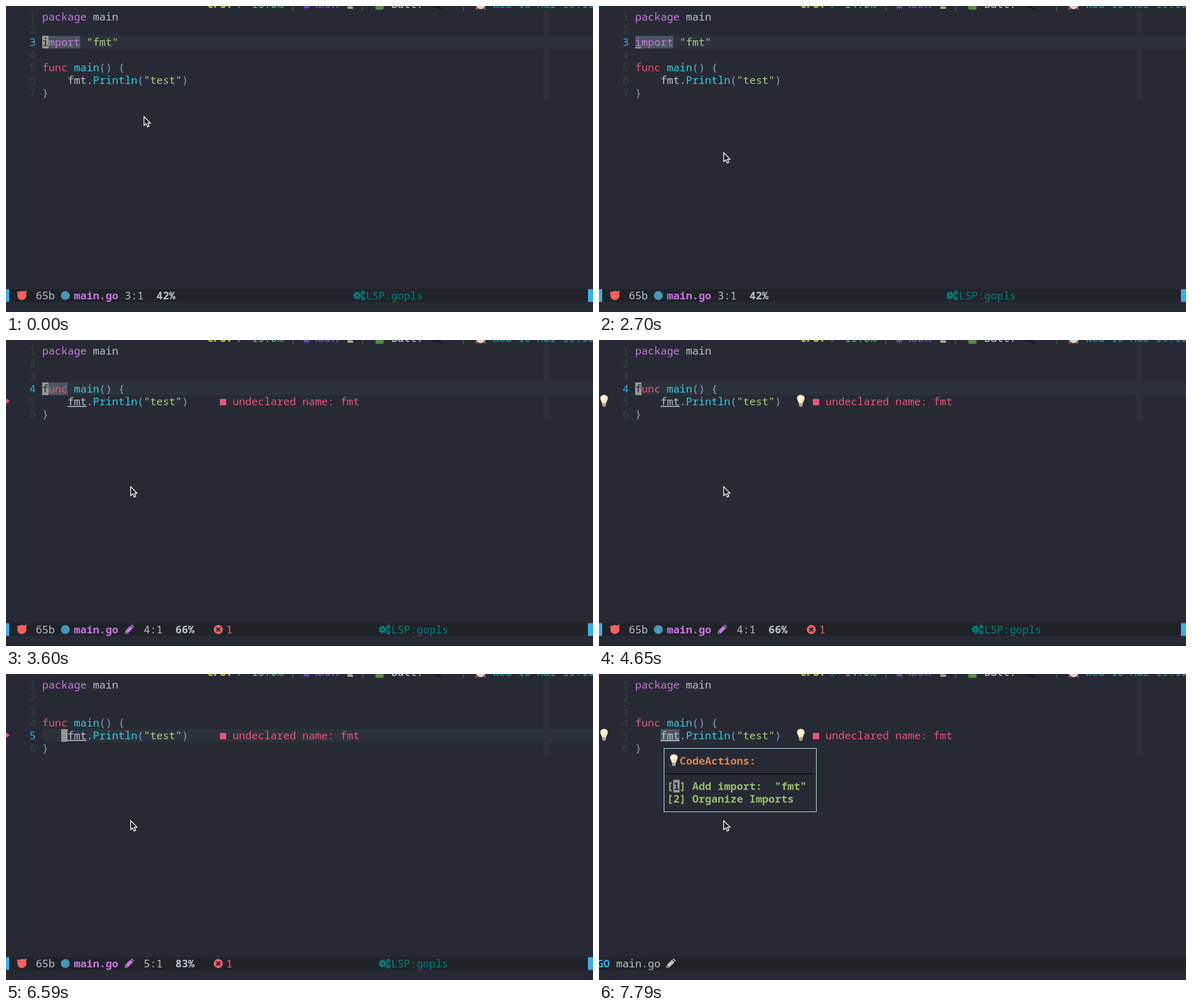
These frames come from a looping animation (925x483 px, 8 s). An HTML page with a canvas:

```html
<!DOCTYPE html>
<html lang="en">
<head>
<meta charset="utf-8">
<title>Editor code action</title>
<style>
html, body { margin: 0; width: 100%; height: 100%; overflow: hidden; background: #272a34; }
canvas { display: block; }
</style>
</head>
<body>
<canvas id="stage" width="925" height="483"></canvas>
<script>
const ctx = document.getElementById('stage').getContext('2d');
const LOOP = 8000, CELL = 10, ROW = 20, LEFT = 57;
const FONT = '16.667px "Noto Sans Mono", "DejaVu Sans Mono", monospace';
const C = {
  bg: '#272a34', line: '#2c323b', column: '#2d303a', bar: '#202328', fg: '#bbc2cf',
  dim: '#3b4049', blue: '#38aeec', magenta: '#c678dd', red: '#e95678', cyan: '#36d0e0',
  bracket: '#80a0c2', string: '#abcf84', teal: '#008080', cursor: '#969696',
  word: '#4b5561', alert: '#fa5f66', menu: '#98be65', gopher: '#4698b8'
};

// Each step changes part of the state and keeps the rest.
const steps = [
  { at: 0, line: 3, col: 1, word: 6, cpu: '16.0%', mouse: [217, 174] },
  { at: 150, mouse: [216, 174] },
  { at: 300, mouse: [214, 177] },
  { at: 450, mouse: [213, 177] },
  { at: 900, mouse: [200, 222] },
  { at: 1050, mouse: [196, 231] },
  { at: 2100, cpu: '14.0%' },
  { at: 2700, pending: true },
  { at: 2850, pending: false, edited: true, word: 0 },
  { at: 3150, cpu: '15.0%' },
  { at: 3600, line: 4, word: 4 },
  { at: 3750, line: 5, word: 0, bulb: true },
  { at: 4650, line: 4 },
  { at: 4800, line: 3, bulb: false },
  { at: 5100, line: 4 },
  { at: 5250, line: 5 },
  { at: 5400, bulb: true },
  { at: 5990, line: 6 },
  { at: 6140, bulb: false, cpu: '16.0%' },
  { at: 6590, line: 5 },
  { at: 6740, bulb: true },
  { at: 7040, col: 2, cpu: '14.0%' },
  { at: 7190, word: 3 },
  { at: 7790, menu: true }
];
const stateAt = t => Object.assign({}, ...steps.filter(s => s.at <= t));

const packageLine = [['package', C.magenta], [' main', C.fg]];
const importLine = [['import', C.magenta], [' "fmt"', C.string]];
const body = [
  [['func', C.red], [' main', C.cyan], ['() {', C.bracket]],
  [['    fmt.', C.fg], ['Println', C.cyan], ['(', C.bracket], ['"test"', C.string], [')', C.bracket]],
  [['}', C.bracket]]
];
const before = [packageLine, [], importLine, [], ...body];
const after = [packageLine, [], [], ...body];

const rowTop = n => 7 + ROW * (n - 1);

function rect(x, y, w, h, color) {
  ctx.fillStyle = color;
  ctx.fillRect(x, y, w, h);
}

function circle(x, y, r, color) {
  ctx.fillStyle = color;
  ctx.beginPath();
  ctx.arc(x, y, r, 0, 2 * Math.PI);
  ctx.fill();
}

function shape(x, y, path, color, outline) {
  const p = new Path2D(path);
  ctx.save();
  ctx.translate(x, y);
  ctx.fillStyle = color;
  ctx.fill(p);
  if (outline) {
    ctx.strokeStyle = outline;
    ctx.lineWidth = 1.3;
    ctx.stroke(p);
  }
  ctx.restore();
}

// Terminal text: one glyph per cell, y is the top of the row.
function text(str, x, y, color, weight = 400) {
  ctx.font = weight + ' ' + FONT;
  ctx.fillStyle = color;
  [...str].forEach((ch, i) => ctx.fillText(ch, x + i * CELL, y + 16));
}

function bulb(x, y) {
  shape(x, y, 'M-3 5C-3 2-6-1-6-4A6 5.5 0 0 1 6-4C6-1 3 2 3 5Z', '#fbeac0');
  circle(x - 1, y - 4, 3, '#fff8e4');
  shape(x, y, 'M-3 4H3V8L1 9.5H-1L-3 8Z', '#a5a49e');
}

function pencil(x, y, color) {
  shape(x, y, 'M0 15L1 10L9 2L13 6L5 14ZM10 1L11.5 0L15 3.5L14 5Z', color);
  shape(x, y, 'M2 11L4 13L1.5 13.5Z', C.bar);
}

function gear(x, y, r) {
  ctx.strokeStyle = C.teal;
  ctx.lineWidth = r * 0.6;
  ctx.beginPath();
  ctx.arc(x, y, r * 0.6, 0, 2 * Math.PI);
  ctx.stroke();
  ctx.lineWidth = r * 0.35;
  ctx.setLineDash([r * Math.PI / 8]);
  ctx.beginPath();
  ctx.arc(x, y, r, 0, 2 * Math.PI);
  ctx.stroke();
  ctx.setLineDash([]);
}

function topBar(s) {
  const y = -13;
  text('CPU:', 317, y, '#c9c92c', 600);
  text('/', 364, y, '#43c98c');
  text(s.cpu, 387, y, '#51dc72', 500);
  for (const x of [447, 557, 716]) text('|', x, y, '#5b6268');
  rect(469, 0, 9, 3, '#7548b8');
  for (const x of [470, 473, 476]) rect(x, 3, 1, 2, '#7548b8');
  text('RAM:', 487, y, '#8a4fc4', 600);
  rect(538, 0, 8, 1, '#d8e0a0');
  rect(538, 2, 9, 2, '#d8e0a0');
  shape(582, 0, 'M0 0H13V4Q13 6 11 6H2Q0 6 0 4Z', '#568d43');
  text('Batt:', 607, y, '#d5d9df');
  shape(673, 0, 'M0 0H8L15 5L12 6L5 2L1 3Z', '#15171c');
  circle(748, -3, 8, '#dcd3cb');
  shape(741, 0, 'M0 1L3 3L1 6L-1 5ZM14 1L11 3L13 6L15 5Z', '#b95346');
  text('Wed 10 Mar 19:10', 767, y, '#16a7d0');
}

function code(s) {
  const lines = s.edited ? after : before;
  const top = rowTop(s.line);
  const cursorX = s.line === 5 ? 77 + s.col * CELL : LEFT;

  if (!s.menu) {
    rect(LEFT, top, 925 - LEFT, ROW, C.line);
    if (s.bulb && s.line === 5) rect(287, top, 40, ROW, C.bg);
  }
  rect(847, 7, 10, lines.length * ROW, C.column);
  rect(cursorX, top, s.word * CELL, ROW, C.word);

  lines.forEach((tokens, i) => {
    const y = rowTop(i + 1), current = !s.menu && i + 1 === s.line;
    text(String(i + 1), 37, y, current ? C.blue : C.dim);
    let x = LEFT;
    for (const [str, color] of tokens) {
      text(str, x, y, color);
      x += str.length * CELL;
    }
  });

  if (s.edited) diagnostic(s);
  if (!s.menu) cursor(s, lines, cursorX, top);
}

function diagnostic(s) {
  const y = rowTop(5);
  rect(97, y + 17, 30, 1.5, C.fg);
  rect(337, y + 6, 10, 10, C.red);
  text('undeclared name: fmt', 357, y, C.red);
  if (s.bulb) {
    bulb(8, y + 9);
    bulb(318, y + 9);
  } else {
    shape(0, y + 5, 'M0 0L6 4.5L0 9Z', C.red);
  }
}

function cursor(s, lines, x, top) {
  if (s.pending) return rect(x, top + 18, CELL, 2, C.cursor);
  rect(x, top, CELL, ROW, C.cursor);
  const chars = lines[s.line - 1].map(token => token[0]).join('');
  text(chars[(x - LEFT) / CELL] || ' ', x, top, C.bg);
  if (s.line === 5 && s.col === 2) rect(x, top + 17, CELL, 1.5, C.bg);
}

function statusLine(s) {
  const y = 447;
  rect(0, y, 925, ROW, C.bar);
  if (s.menu) {
    text('GO', -3, y, C.blue, 600);
    text('main.go', 27, y, C.fg);
    pencil(106, 449, C.fg);
    return;
  }
  rect(0, y, 5, ROW, C.blue);
  rect(917, y, 8, ROW, C.blue);
  circle(25, 457, 7.2, C.alert);
  shape(17, 449, 'M0 2L5 2L2 7ZM16 0L10 2L14 7Z', C.alert);
  text('65b', 47, y, C.fg);
  circle(93.5, 457, 7, C.gopher);
  text('main.go', 107, y, C.magenta, 600);

  const shift = s.edited ? 30 : 0;
  const percent = s.line === 6 ? 'Bot' : Math.floor(100 * s.line / (s.edited ? 6 : 7)) + '%';
  text(s.line + ':' + s.col, 187 + shift, y, C.fg);
  text(percent, 237 + shift, y, C.fg, 600);
  if (s.edited) {
    pencil(187, 449, C.magenta);
    circle(334.5, 457, 7.2, C.alert);
    text('1', 347, y, C.alert);
    ctx.strokeStyle = C.bar;
    ctx.lineWidth = 2.2;
    ctx.stroke(new Path2D('M331.5 454l6 6m0-6l-6 6'));
  }
  const lspX = s.edited ? 587 : 547;
  gear(lspX + 6.5, 457, 5.5);
  gear(lspX + 15.5, 452.5, 3);
  gear(lspX + 15.5, 461.5, 3);
  text('LSP:gopls', lspX + 20, y, C.teal, 500);
}

function menu() {
  rect(102, 117, 241, 101, C.bg);
  ctx.strokeStyle = '#add8e6';
  ctx.lineWidth = 1;
  ctx.strokeRect(102.5, 117.5, 240, 100);
  bulb(118, 136);
  text('CodeActions:', 127, 127, '#df8544', 600);
  rect(107, 157, 230, 1, '#000');
  text('[1] Add import:  "fmt"', 107, 167, C.menu, 600);
  text('[2] Organize Imports', 107, 187, C.menu, 600);
  rect(117, 167, CELL, ROW, C.cursor);
  text('1', 117, 167, C.bg, 600);
}

function draw(t) {
  const s = stateAt(t);
  rect(0, 0, 925, 483, C.bg);
  topBar(s);
  code(s);
  statusLine(s);
  rect(0, 482, 925, 1, '#1e2128');
  if (s.menu) menu();
  shape(s.mouse[0] + 0.5, s.mouse[1] + 0.5,
    'M0 0V14L3.2 11.2L5.5 16.3L8 15.2L5.8 10.3H10Z', '#111', '#fff');
}

const start = performance.now();
function frame() {
  draw((performance.now() - start) % LOOP);
  requestAnimationFrame(frame);
}
frame();
</script>
</body>
</html>
```
